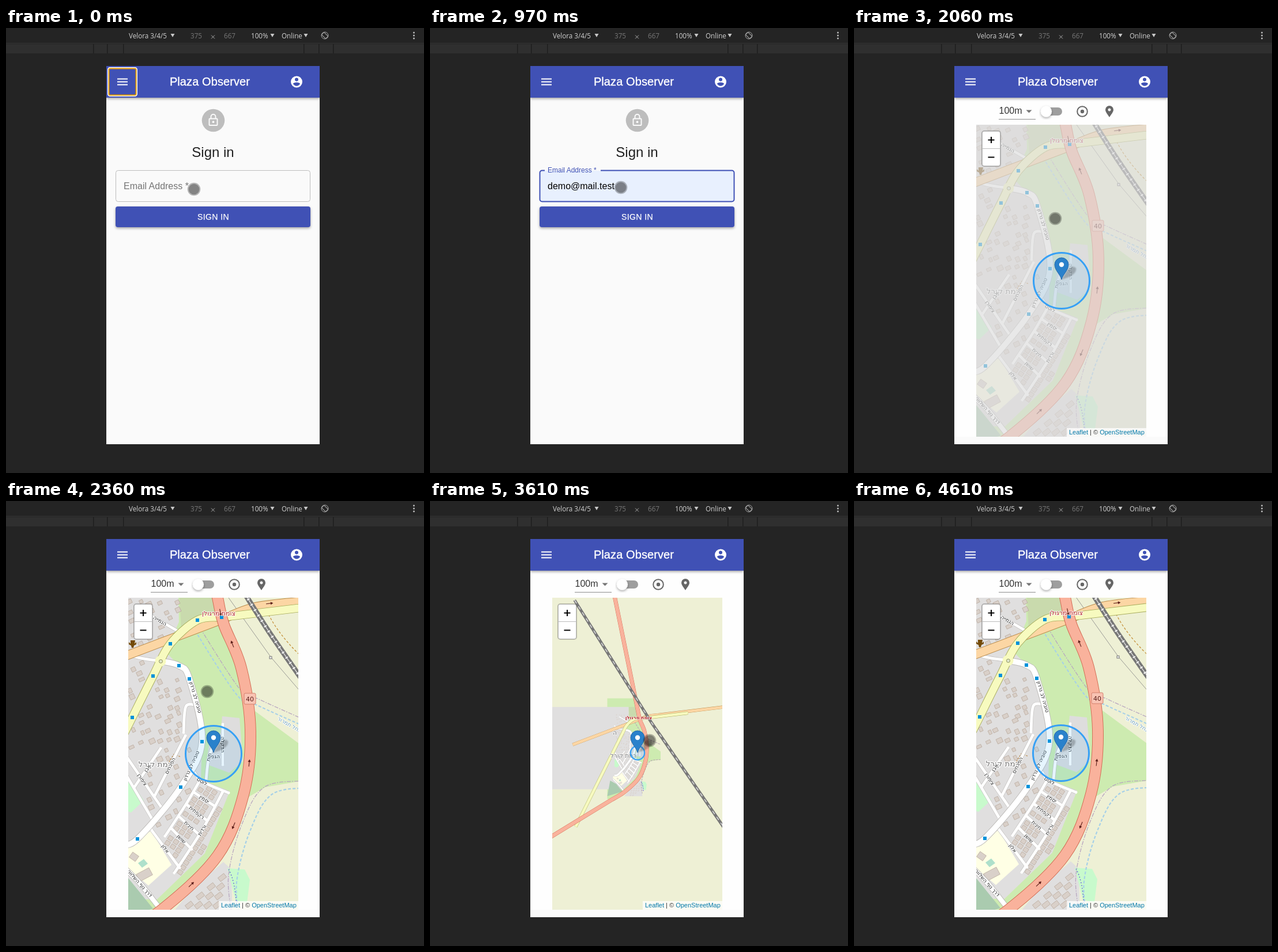
Animation of 725 by 773 pixels, one loop 6.08 s. Source, as an HTML page:

```html
<!DOCTYPE html>
<html lang="en">
<head>
<meta charset="utf-8">
<title>Plaza Observer</title>
<style>
html, body { margin: 0; width: 100%; height: 100%; overflow: hidden; background: #242424; }
svg { display: block; width: 725px; height: 773px; }
text { font-family: "Liberation Sans", Arial, sans-serif; white-space: pre; }
.ui { font-family: "Open Sans", "Noto Sans", sans-serif; }
.map text { font-family: "DejaVu Sans", "Noto Sans", sans-serif; paint-order: stroke; stroke-linejoin: round; text-anchor: middle; }
</style>
</head>
<body>
<svg id="stage" viewBox="0 0 725 773" xmlns="http://www.w3.org/2000/svg"></svg>
<script>
const LOOP = 6080;
const BEAT = 139;       // the screen is refreshed once per beat
const BEAT_LEAD = 31;
const stage = document.getElementById('stage');

// ---------- markup helpers ----------
const rect = (x, y, w, h, fill, more = '') => `<rect x="${x}" y="${y}" width="${w}" height="${h}" fill="${fill}" ${more}/>`;
const dot = (x, y, r, fill, more = '') => `<circle cx="${x}" cy="${y}" r="${r}" fill="${fill}" ${more}/>`;
const path = (d, fill, more = '') => `<path d="${d}" fill="${fill}" ${more}/>`;
const line = (d, color, width, more = '') => path(d, 'none', `stroke="${color}" stroke-width="${width}" ${more}`);
const text = (x, y, size, fill, s, more = '') => `<text x="${x}" y="${y}" font-size="${size}" fill="${fill}" ${more}>${s}</text>`;
const group = (id, body, more = '') => `<g id="${id}" ${more}>${body}</g>`;
const dashes = s => `stroke-dasharray="${s}"`;
const repeat = (n, make) => Array.from({ length: n }, (_, i) => make(i));

// ---------- geometry helpers ----------
const lerp = (a, b, k) => a + (b - a) * k;
const mix = (p, q, k) => p.map((v, i) => lerp(v, q[i], k));
const shift = (p, dx, dy) => p.map(([x, y]) => [x + dx, y + dy]);
const poly = p => 'M' + p.map(q => q.join(' ')).join('L') + 'Z';
const angle = (p, q) => Math.atan2(q[1] - p[1], q[0] - p[0]) * 180 / Math.PI;

// smooth line through the points
function curve(p) {
  let d = 'M' + p[0].join(' ');
  for (let i = 0; i < p.length - 1; i++) {
    const a = p[i - 1] || p[i], b = p[i], c = p[i + 1], e = p[i + 2] || c;
    d += `C${b.map((v, k) => v + (c[k] - a[k]) / 6).join(' ')} ${c.map((v, k) => v - (e[k] - b[k]) / 6).join(' ')} ${c.join(' ')}`;
  }
  return d;
}

// the same line, carried straight on at both ends
function longCurve(p) {
  const n = p.length;
  return `M${mix(p[1], p[0], 9).join(' ')}L` + curve(p).slice(1) + `L${mix(p[n - 2], p[n - 1], 9).join(' ')}`;
}

function seeded(seed) {
  return () => (seed = (seed * 16807) % 2147483647) / 2147483647;
}

function inside(x, y, p) {
  let hit = false;
  p.forEach(([ax, ay], i) => {
    const [bx, by] = p[(i + 1) % p.length];
    if (ay > y !== by > y && x < (bx - ax) * (y - ay) / (by - ay) + ax) hit = !hit;
  });
  return hit;
}

function gap(x, y, p) {
  let best = 1e9;
  for (let i = 1; i < p.length; i++) {
    const [ax, ay] = p[i - 1], dx = p[i][0] - ax, dy = p[i][1] - ay;
    const k = Math.max(0, Math.min(1, ((x - ax) * dx + (y - ay) * dy) / (dx * dx + dy * dy)));
    best = Math.min(best, Math.hypot(x - ax - k * dx, y - ay - k * dy));
  }
  return best;
}

// ---------- map ----------
const trunk = [[345, 60], [367, 168], [378, 215], [408, 290], [424, 400], [412, 510], [367, 616], [270, 710], [180, 765]];
const yellow = [[219, 376], [255, 304], [285, 248], [332, 207], [374, 202]];
const orange = [[374, 206], [432, 184], [515, 174]];
const mainStreet = [[268, 278], [300, 286], [318, 309], [340, 418], [303, 497], [228, 587], [200, 596]];
const greenWay = [[190, 622], [232, 664], [270, 712]];
const border = [[330, 210], [405, 326], [440, 345], [520, 381]];
const lowBorder = [[520, 486], [448, 497], [409, 562], [386, 650], [392, 720]];
const rail = [[395, 130], [454, 224], [516, 314]];
const homes = [[-300, 120], [298, 120], [300, 210], [277, 262], ...mainStreet.slice(1, 4), [338, 484], [388, 504], [345, 612], [262, 692], [-300, 692]];
const block = [[336, 492], [382, 510], [342, 606], [300, 650], [258, 584], [300, 535]];
const southHomes = [[325, 672], [377, 627], [391, 640], [393, 740], [268, 740]];

const street = (name, ...p) => ({ name, p });
const streets = [
  street('הנמייה', [236, 190], [298, 226]),
  street('', [200, 252], [222, 270], [268, 278]),
  street('', [331, 355], [312, 357], [308, 402]),
  street('לוטם', [325, 468], [340, 487], [386, 507]),
  street('', [337, 484], [312, 527], [276, 582]),
  street('ורדית', [376, 505], [340, 572], [292, 646]),
  street('אלון', [252, 571], [301, 637]),
  street('תות', [347, 485], [352, 445], [365, 412]),
  street('הדקלה', [376, 388], [376, 458]),
  ...['הפרחים', 'אבן'].map((s, i) => street(s, [311 - 43 * i, 408 + 22 * i], [258 - 36 * i, 512 - 14 * i])),
  ...['ציפורן', ''].map((s, i) => street(s, [205, 438 + 32 * i], [268 - 16 * i, 530 + 20 * i])),
  ...['יסמין', 'רקפתית', 'חינית', 'שושן'].map((s, i) => street(s, mix([326, 506], [287, 569], i / 3), mix([362, 530], [322, 605], i / 3)))
];

function house(x, y, w, h, turn) {
  return rect(-w / 2, -h / 2, w, h, '#d9d0c9', `transform="translate(${x} ${y}) rotate(${turn})"`);
}

function drawHouses() {
  const rnd = seeded(71), wide = [yellow, mainStreet];
  const free = (x, y, d) => wide.every(p => gap(x, y, p) > d + 4) && streets.every(s => gap(x, y, s.p) > d);
  let out = '';
  for (let y = 172; y < 575; y += 15) for (let x = 214; x < 345; x += 16) {
    const px = x + rnd() * 8, py = y + rnd() * 8, w = 5 + rnd() * 5, h = 5 + rnd() * 4;
    const lawn = py > 450 && px < 240;
    if (rnd() > .2 && !lawn && inside(px, py, homes) && !inside(px, py, block) && free(px, py, 7)) out += house(px, py, w, h, -25);
  }
  // terraced rows
  for (let row = -6; row < 8; row++) for (let col = -12; col < 13; col++) {
    const px = 325 + row * 9.4 - col * 5.2, py = 565 + row * 6.4 + col * 8.4;
    if (inside(px, py, block) && free(px, py, 5.2)) out += house(px, py, 8, 7.4, 34);
  }
  for (let i = 0; i < 4; i++) for (let j = 0; j < 4; j++) {
    const px = 318 + i * 19 - j * 3, py = 702 - i * 16 + j * 16;
    if (inside(px, py, southHomes)) out += house(px, py, 13, 8, -38);
  }
  return out + house(240, 649, 25, 14, -28) + house(222, 618, 13, 11, 35);
}

function arrow([x, y], turn) {
  return `<g transform="translate(${x} ${y}) rotate(${turn})">` + line('M-6 0H3', '#5b1d18', 1.1) + path('M2 -2.6L6.5 0L2 2.6Z', '#5b1d18') + '</g>';
}

// arrows halfway between key points, every other one facing back
function arrows(p) {
  return p.slice(1, -2).map((b, i) => {
    const a = p[i], c = p[i + 2], e = p[i + 3];
    return arrow(b.map((v, k) => (9 * (v + c[k]) - a[k] - e[k]) / 16), angle(b, c) + i % 2 * 180);
  }).join('');
}

function label(x, y, turn, size, s, fill = '#222', halo = 2, more = '') {
  return text(0, size * .35, size, fill, s, `stroke="#fff" stroke-opacity=".85" stroke-width="${halo}" transform="translate(${x} ${y}) rotate(${turn})" ${more}`);
}

// name in the middle of a line, never upside down
function lineName(p, s, size = 9, fill = '#222') {
  const a = p[0], b = p[p.length - 1], turn = angle(a, b);
  const [x, y] = p.length > 2 ? p[p.length >> 1] : mix(a, b, .5);
  return s ? label(x, y, Math.abs(turn) > 90 ? turn + 180 : turn, size, s, fill) : '';
}

function road(d, fill, edge, width, rim) {
  return line(d, edge, width + rim) + line(d, fill, width);
}

function drawLand() {
  return rect(-900, -900, 2600, 2800, '#eef0d5') +
    path(curve(trunk) + 'L150 760L150 60Z', '#cdebb0') +
    path(poly([[298, 120], [352, 120], [365, 200], [304, 222]]), '#c9daad') +
    path(poly([[432, 365], [520, 430], [520, 485], [450, 497], [414, 518]]), '#cdebb0') +
    path(poly(homes), '#e0dfdf') + path(poly(southHomes), '#e0dfdf') +
    path(poly([[375, 374], [405, 377], [411, 452], [387, 472], [347, 457], [354, 412], [372, 404]]), '#dedddd') +
    path(poly([[200, 484], [217, 488], [239, 520], [217, 541], [200, 535]]), '#c8facc') +
    path(poly([[190, 604], [252, 573], [287, 632], [247, 668], [190, 620]]), '#ffffe5') +
    path(poly([[229, 629], [239, 622], [246, 630], [236, 637]]), '#aee0cb') +
    path(poly([[170, 632], [212, 655], [255, 708], [150, 740]]), '#aacbaf') +
    path(poly([[384, 638], [414, 640], [423, 658], [418, 698], [398, 694]]), '#c8facc');
}

function drawRoads(rough) {
  const rim = rough ? 3 : 1.8;
  return streets.map(s => line(curve(s.p), '#c5c3c1', rough ? 9 : 6.2)).join('') +
    streets.map(s => line(curve(s.p), '#fff', rough ? 7 : 4.8, 'stroke-linecap="round"')).join('') +
    road(curve(greenWay), '#fff', '#b9b7b3', 8, rim) + road(curve(mainStreet), '#fff', '#bdbbb8', rough ? 14 : 10, rim) +
    road(longCurve(orange), '#fcd6a4', '#b98b4b', rough ? 19 : 14, rim) + road(longCurve(yellow), '#f7fabf', '#a6aa5a', rough ? 19 : 13, rim) +
    road(longCurve(trunk), '#f9b29c', '#d0674f', rough ? 25 : 18, rim);
}

// far zoom level: bold strokes, big names
function drawRough(built) {
  const bounds = line(curve(border), '#bcaeb4', 5, dashes('13 6')) + line(curve(lowBorder), '#bcaeb4', 5, dashes('13 6'));
  const tracks = line(longCurve(rail), '#777', 20) + line(longCurve(rail), '#ddd', 6, dashes('26 24')) + line(longCurve(shift(rail, 3, 22)), '#777', 2);
  return drawLand() + `<g opacity=".6">${built}</g>` + bounds + line('M386 640Q398 660 400 708', '#6a63d8', 5, dashes('6 6')) +
    drawRoads(true) + tracks + label(368, 195, 0, 32, 'צומת מרגולן', '#b5262d', 5, 'font-weight="bold"') +
    label(262, 459, 0, 42, 'רמת קורל', '#777', 6) + label(203, 300, 0, 42, 'ה', '#777', 6);
}

// near zoom level
function drawFine(built) {
  const bound = dashes('7 2 2 2'), wet = dashes('5 3');
  const water = line(curve(shift(border, -6, 9)), '#a6d0e8', 2, wet) + line(curve(shift(lowBorder, 14, 12)), '#a6d0e8', 2.2, wet);
  const bounds = line(curve(border), '#b8a6c0', 1.3, bound) + line(curve(lowBorder), '#b8a6c0', 1.3, bound) + line('M386 640Q398 660 400 708', '#6a63d8', 1.3, dashes('2 3'));
  const paths = line('M447 178Q464 224 512 270', '#c28a2f', 1.2, dashes('4 3')) + line('M280 458L291 440L302 444', '#b9813c', 1.2, dashes('3 2')) +
    line('M386 168L460 272L520 342', '#858585', .8) + rect(457, 270, 4, 4, '#eee', 'stroke="#777"');
  const circle = dot(268, 278, 9.5, '#f7fabf') + dot(268.5, 278.5, 3, '#dfe6cc', 'stroke="#8a8c55"');
  const tracks = line(longCurve(rail), '#777', 9) + line(longCurve(rail), '#f5f5f5', 5, dashes('2 9')) + line(longCurve(rail), '#eee', 1.2);
  const stops = [...yellow, ...mainStreet.slice(1)].map(([x, y]) => rect(x - 3, y - 3, 6, 6, '#0092da')).join('');
  const vase = path('M216 242h8l-1 6 3-3v4l-4 2-1 4h-3l-1-4-4-2v-4l3 3Z', '#734a08');
  const shield = rect(413, 334, 20, 19, '#f9c3b3', 'rx="2" stroke="#d3806d"') + text(423, 348, 11, '#5b1d18', '40');
  const mainName = label(329, 341, 74, 9, 'טוביה לב נרדון') + label(321, 460, -66, 9, 'טוביה לב נרדון');
  const names = label(369, 195, 0, 11, 'צומת מרגולן', '#b5262d') + label(259, 457, 0, 13.5, 'רמת קורל', '#777', 3) + label(362, 444, 0, 9, 'הגפן') +
    mainName + streets.map(s => lineName(s.p, s.name)).join('') + lineName(greenWay, 'דרך נוף השלווה') + label(491, 388, 30, 9.5, 'נחל תמרור', '#6b9fc2');
  return drawLand() + `<g stroke="#b8a89b" stroke-width=".7">${built}</g>` + water + paths + bounds + drawRoads(false) + circle + tracks +
    arrows(trunk) + arrow([457, 178], -7) + stops + vase + shield + names;
}

// ---------- app ----------
function devtools() {
  const down = x => path(`M${x - 3.5} 10h7l-3.5 6Z`, '#c8c8c8');
  const say = (x, s, fill = '#d0d0d0') => text(x, 17.5, 11.7, fill, s, 'class="ui"');
  return rect(0, 0, 725, 773, '#242424') + rect(0, 26, 725, 1, '#353535') + rect(0, 28, 725, 16, '#2f2f2f') +
    [151, 175, 203, 516, 542, 567].map(x => rect(x, 28, 1.5, 16, '#1e1e1e')).join('') +
    say(213, 'Velora 3/4/5') + down(289) + say(320, '375', '#777') + line('M356 12.5l6 6m0-6l-6 6', '#aaa', 1) + say(378, '667', '#777') +
    say(425, '100%') + down(462) + say(478, 'Online') + down(520) +
    rect(550, 8, 6, 10, 'none', 'rx="1" stroke="#aaa" transform="rotate(-45 553 13)"') + dot(553, 13, 6, 'none', 'stroke="#aaa"') +
    repeat(3, i => dot(707.5, 8 + 5 * i, 1.5, '#bbb')).join('');
}

function header() {
  return rect(174, 66, 370, 55, '#3f51b5', 'filter="url(#drop)"') +
    repeat(3, i => rect(193, 87.5 + 5 * i, 18, 2, '#fff')).join('') +
    text(353.5, 100, 20, '#fff', 'Plaza Observer', 'text-anchor="middle" letter-spacing=".1" stroke="#fff" stroke-width=".35"') +
    dot(504, 93.5, 10, '#fff') + dot(504, 89.5, 3, '#3f51b5') + path('M498 97.2C498 93.6 510 93.6 510 97.2Q504 104.5 498 97.2Z', '#3f51b5') +
    group('menuRing', rect(177.5, 69.5, 49, 48, 'none', 'rx="3" stroke="#fff" stroke-width="3"') + rect(178.5, 70.5, 47, 46, 'none', 'rx="2" stroke="#e59700" stroke-width="2"'));
}

function signIn() {
  const people = ['demo@mail.test', 'mirelon.demo@mail.test', 'demos4@post.lorvan.test', 'PortableGardens', 'tolumer384@oru5box.test', 'rona@mail.test'];
  return dot(359.5, 160.5, 19.8, '#bdbdbd') + rect(352.5, 157.5, 14, 11.5, 'none', 'rx="1" stroke="#fafafa" stroke-width="2"') +
    line('M355.5 157v-3a4 4 0 0 1 8 0v3', '#fafafa', 2) + dot(359.5, 163.2, 1.9, '#fafafa') +
    text(359, 224, 24, '#212121', 'Sign in', 'text-anchor="middle"') +
    rect(191, 248, 336, 54, '#e8f0fe', 'rx="4" id="fieldFill"') + line('', '#c4c4c4', 1, 'id="outline"') +
    text(204, 280, 16, '#757575', 'Email Address *', 'id="hint"') + text(204, 280, 16, '#000', 'demo@mail.test', 'id="typed"') +
    rect(190, 310, 338, 36, '#3f51b5', 'rx="4" filter="url(#drop)"') +
    `<g clip-path="url(#buttonClip)">` + dot(349, 331, 0, '#fff', 'id="ripple" fill-opacity=".13"') + '</g>' +
    text(359.5, 333, 14, '#fff', 'SIGN IN', 'text-anchor="middle" letter-spacing=".38" stroke="#fff" stroke-width=".25"') +
    rect(190, 310, 338, 36, 'none', 'rx="2.5" stroke="#e59700" stroke-width="2" id="buttonRing"') +
    group('list', rect(190, 303.5, 338, 228, '#292a2d', 'rx="3" filter="url(#drop)"') + rect(190, 311, 338, 36, '#4a4b4e', 'id="row"') +
      people.map((s, i) => text(515.5, 333.5 + i * 35.5, 12.4, '#f1f1f1', s, 'class="ui" text-anchor="end" font-weight="600"')).join(''));
}

function mapPage() {
  const built = drawHouses();
  const pin = 'M0 0C-2 -9 -12 -16 -12 -26A12 12 0 0 1 12 -26C12 -16 2 -9 0 0Z';
  return rect(174, 122, 370, 588, '#fefefe') + text(251.5, 149, 16, '#333', '100m') + rect(251, 158, 64, 1, '#8c8c8c') + path('M298.5 142.5h10l-5 5Z', '#757575') +
    rect(329, 138, 32, 14, '#9e9e9e', 'rx="7"') + dot(333.5, 145, 9.6, '#fff', 'filter="url(#drop)"') +
    dot(396, 145, 8.8, 'none', 'stroke="#666" stroke-width="2"') + dot(396, 145, 3.2, '#666') +
    path('M443 155C440 150 436 146 436 142a7 7 0 0 1 14 0C450 146 446 150 443 155ZM443 139.5a2.5 2.5 0 1 0 .01 0Z', '#666', 'fill-rule="evenodd"') +
    rect(212, 168, 295, 542, '#ddd') + `<g clip-path="url(#mapClip)">` +
    group('view', group('rough', drawRough(built), 'class="map" filter="url(#soft)"') + group('fine', drawFine(built), 'class="map"') +
      dot(360, 439, 48.5, '#3af', 'id="range" fill-opacity=".12" stroke="#36a0f5"')) +
    group('pin', path('M0 0L9 -15Q18 -27 25 -20Q27 -11 12 -4Z', '#000', 'opacity=".22" filter="url(#soft)"') + path(pin, '#2a81cb', 'stroke="#2468a8"') + dot(0, -26, 4.2, '#fff')) + '</g>' +
    rect(222, 179, 32, 61, '#fff', 'rx="4" stroke="#000" stroke-opacity=".25" stroke-width="2"') + rect(223, 209, 30, 1, '#bbb') +
    line('M232.5 194.5h11m-5.5-5.5v11M232.5 224.5h11', '#000', 2) +
    rect(369, 695, 138, 15, '#fff', 'fill-opacity=".75"') +
    text(373, 706, 11, '#0078a8', 'Leaflet<tspan fill="#333"> | © </tspan>OpenStreetMap');
}

stage.innerHTML = `<defs>
  <filter id="drop" x="-10%" y="-10%" width="120%" height="130%"><feDropShadow dx="0" dy="2" stdDeviation="2" flood-opacity=".35"/></filter>
  <filter id="soft"><feGaussianBlur stdDeviation=".9"/></filter>
  <clipPath id="phoneClip">${rect(174, 66, 370, 657, '#000')}</clipPath>
  <clipPath id="mapClip">${rect(212, 168, 295, 542, '#000')}</clipPath>
  <clipPath id="tileClip">${rect(212, 184, 263, 526, '#000')}</clipPath>
  <clipPath id="buttonClip">${rect(190, 310, 338, 36, '#000', 'rx="4"')}</clipPath></defs>` +
  devtools() + `<g clip-path="url(#phoneClip)">` + rect(174, 66, 370, 657, '#fafafa') +
  group('signIn', signIn()) + group('mapPage', mapPage()) + header() + '</g>' +
  group('touch', dot(0, 0, 11.3, '#000', 'fill-opacity=".27"') + dot(0, 0, 9.3, '#000', 'fill-opacity=".27"')) +
  group('mouse', path('M0 0V16L3.8 12.5L6.5 18.5L9.2 17.3L6.6 11.5H11.5Z', '#fff', 'stroke="#222"'));

// ---------- timeline, counted in beats ----------
const parts = {};
stage.querySelectorAll('[id]').forEach(e => parts[e.id] = e);
const set = (id, values) => { for (const k in values) parts[id].setAttribute(k, values[k]); };
const show = (id, on) => set(id, { display: on ? 'inline' : 'none' });
const ramp = (b, from, to) => Math.max(0, Math.min(1, (b - from) / (to - from)));
const easeOut = k => 1 - (1 - k) ** 1.7;

const RAISED = 3, TYPED = 4, PICKED = 6, PRESS = 11, MAP = 13, LOADED = 17, ZOOM_OUT = 23, FAR = 26, NEAR = 29, SHARP = 32;

function place(id, spot) {
  show(id, spot);
  if (spot) set(id, { transform: `translate(${spot.join(' ')})` });
}

function touchSpot(b) {
  if (b < 2) return [326, 280];
  if (b >= PICKED && b < 19) return mix([331, 277], [349, 331], ramp(b, 8, 10));
  if (b >= 20 && b < 33) return mix([381, 416], [385, 650], ramp(b, NEAR, 31));
}

function mouseSpot(b) {
  if (b >= RAISED && b < PICKED) return mix([324, 300], [380, 323], ramp(b, 2, TYPED));
}

function drawSignIn(b) {
  const up = ramp(b, 0, RAISED), focus = b > 0 && b < PRESS;
  set('outline', {
    d: `M${199 + 97 * up} 247.5H523.5a4 4 0 0 1 4 4V297.5a4 4 0 0 1 -4 4H194.5a4 4 0 0 1 -4 -4V251.5a4 4 0 0 1 4 -4H199`,
    stroke: focus ? '#3f51b5' : '#bdbdbd', 'stroke-width': focus ? 2 : 1
  });
  set('hint', { y: lerp(280, 251, up), 'font-size': lerp(16, 12, up), fill: focus ? '#3f51b5' : '#757575' });
  show('fieldFill', b >= RAISED);
  show('row', b >= RAISED);
  show('typed', b >= TYPED);
  set('typed', { 'font-size': b < PICKED ? 13.33 : 16 });
  show('list', b >= 2 && b < PICKED);
  set('ripple', { r: 51 * ramp(b, PRESS - 1, PRESS + 1) });
  show('buttonRing', b >= PRESS);
}

function drawView(b) {
  const far = b >= FAR && b < SHARP;
  const away = b < FAR ? easeOut(ramp(b, ZOOM_OUT, FAR)) : 1 - easeOut(ramp(b, FAR, NEAR));
  const [x, y] = b >= NEAR ? [359, 436] : [360, 437];
  set('view', { transform: `translate(${x} ${y}) scale(${lerp(1, .25, away)}) translate(-360 -437)` });
  set('fine', { opacity: b < FAR ? ramp(b, 14, LOADED) : ramp(b, NEAR, SHARP), 'clip-path': b >= ZOOM_OUT && b < FAR ? 'url(#tileClip)' : 'none' });
  show('rough', far);
  set('range', { 'stroke-width': b >= FAR && b <= NEAR ? 9 : 3 });
  show('range', b > 14);
  place('pin', b > 14 && [x, y]);
}

function draw(t) {
  const b = Math.floor((t + BEAT_LEAD) / BEAT), mapOpen = b >= MAP;
  show('signIn', !mapOpen);
  show('mapPage', mapOpen);
  show('menuRing', b === 0);
  if (mapOpen) drawView(b); else drawSignIn(b);
  place('touch', touchSpot(b));
  place('mouse', mouseSpot(b));
}

const start = performance.now();
function tick() {
  draw((performance.now() - start) % LOOP);
  requestAnimationFrame(tick);
}
tick();
</script>
</body>
</html>
```
